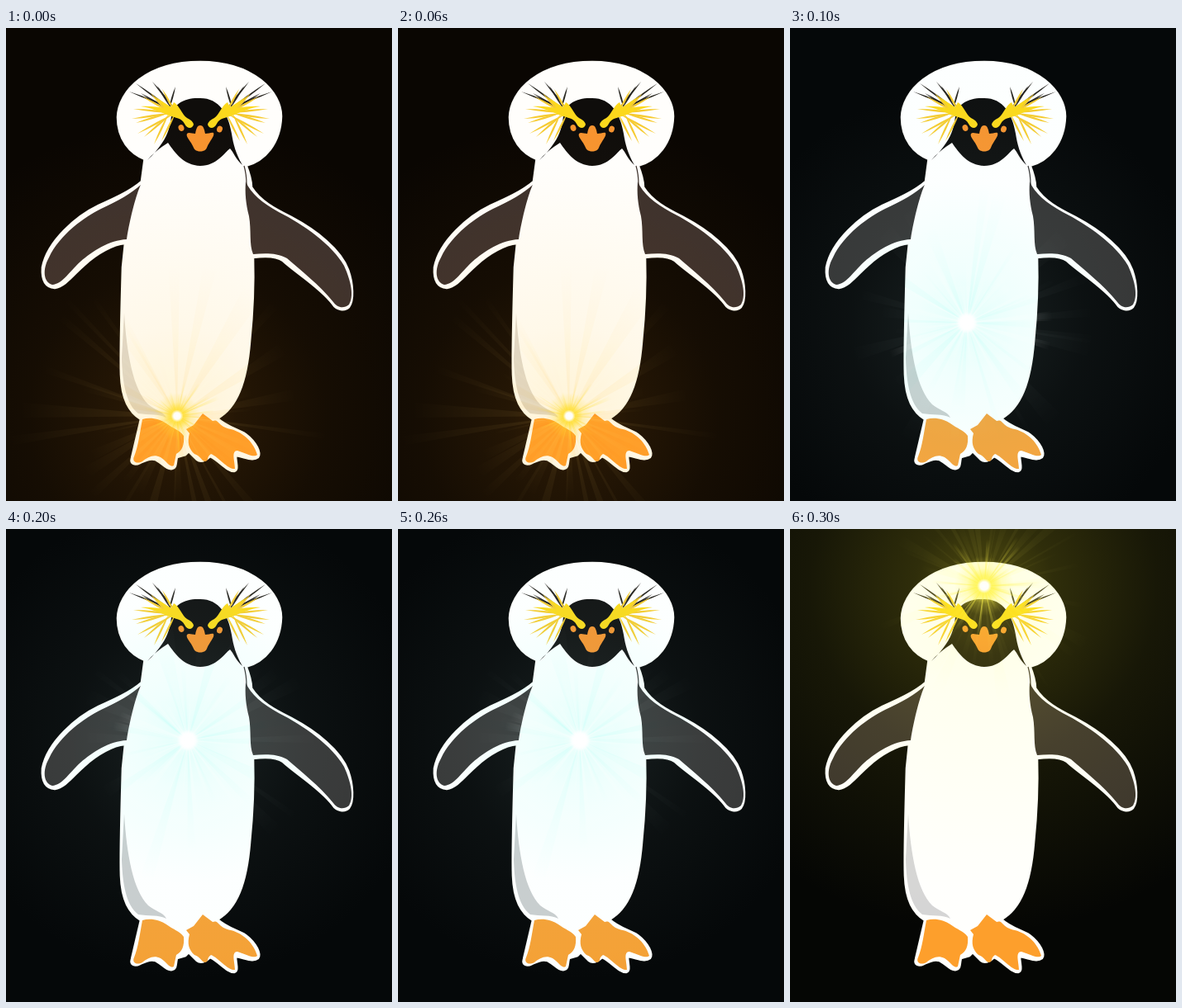
An HTML page with a canvas that plays this animation: 467x573 px, repeating every 0.4 s.

```html
<!DOCTYPE html>
<html lang="en">
<head>
<meta charset="utf-8">
<title>Penguin with a rising light</title>
<style>
  html, body { margin: 0; width: 100%; height: 100%; overflow: hidden; background: #050503; }
  canvas { display: block; width: 467px; height: 573px; }
</style>
</head>
<body>
<canvas width="467" height="573"></canvas>
<script>
const W = 467, H = 573, STEP = 100;
const ctx = document.querySelector('canvas').getContext('2d');

const shape = {
  head: 'M168 159C150 152 135 135 135 108C136 76 170 41 235 41C300 41 333 78 333 107C332 140 313 161 290 167L235 180Z',
  outline: `M168 156L164 186C150 198 130 207 112 215C85 228 50 258 44 290C43 305 48 314 59 315
    C72 313 82 298 95 287C110 273 130 262 144 261L141 290C140 330 138 390 139 420C140 450 149 465 163 474
    L152 521C150 528 156 530 162 527C170 524 174 521 181 523C190 528 194 535 201 534
    C207 533 205 526 207 520L217 517L221 513L231 523Q237 528 247 519C258 524 267 537 276 537
    C282 535 278 527 278 518C290 520 299 525 305 520C309 515 303 502 290 492C280 486 267 483 256 473
    C279 460 291 430 295 380C299 340 300 310 299 278C315 276 327 276 335 282C350 296 380 314 395 334
    C400 342 410 343 415 338C421 330 420 310 414 293C405 268 375 245 345 229C325 219 308 210 297 193
    C297 185 294 175 290 165L235 130Z`,
  wings: `M163 190C158 200 150 230 146 256C125 257 105 270 90 283C75 297 68 310 56 311
    C45 308 44 292 52 278C65 250 95 229 115 219C135 210 152 200 163 190Z
    M290 186C296 200 310 212 330 223C360 238 395 263 409 288C418 308 421 325 415 335
    C408 341 400 338 396 332C380 312 355 292 340 279C328 272 312 273 299 274
    C294 262 297 245 294 228C290 212 289 200 290 186Z`,
  mask: `M235 85C216 84 203 92 200 106C199 118 196 129 189 139Q181 151 171 160Q180 149 196 139
    C205 152 215 166 235 167C255 167 265 150 271 146C275 150 278 159 286 166
    C278 152 275 141 273 128C269 104 258 85 235 85Z`,
  shade: `M143 345C146 395 154 438 172 456C180 463 190 464 194 472C185 467 172 469 160 467
    C145 455 141 430 140 400Z`,
  feet: `M165 474C175 471 187 474 194 479C202 485 210 487 215 494C216 505 213 512 206 516L203 530
    C198 533 195 525 187 520C178 516 172 520 165 525C158 529 152 525 155 519C160 507 162 490 165 474Z
    M238 467L250 476C258 473 256 483 272 486C288 490 300 503 304 517C300 521 290 515 280 512
    C272 512 277 525 277 534C268 535 258 520 248 516C242 520 246 524 241 525C237 525 235 518 228 516
    C221 510 219 502 222 491L218 486L227 481Z`,
  brow: `M227 117C225 123 219 122 216 116C213 109 205 109 197 106C186 101 176 97 163 95
    C174 94 184 96 192 97L180 83L200 96L203 90C210 94 213 105 219 109Q226 112 227 117Z`,
  beak: `M235 118C239 118 240 123 241 128C245 128 249 126 251 127C253 131 246 137 243 145
    C241 151 229 151 227 145C224 137 217 132 219 128C221 126 225 128 229 128C230 123 231 118 235 118Z`
};
const path = Object.fromEntries(Object.entries(shape).map(([name, d]) => [name, new Path2D(d)]));

// Tips of the crest feathers for the left side; the right side is mirrored.
const darkTips = [[149, 77], [157, 67], [163, 79], [177, 65], [183, 70], [205, 71]];
const goldTips = [[154, 98], [152, 110], [157, 115], [159, 128], [167, 132], [179, 141], [188, 137], [165, 83], [175, 79], [189, 74]];

const scenes = [
  { x: 207, y: 470, bg: '#0a0602', wing: '#3b302d', shade: '#dedad4', foot: '#ff9d2b', mask: '#0f0d0b',
    tint: '255,238,200', wide: 310, glow: '120,72,12', reach: 360, power: .42,
    rays: 40, length: 200, ray: '255,205,100', core: '255,222,45', coreSize: 28, dot: 5 },
  { x: 214, y: 357, bg: '#050809', wing: '#343434', shade: '#c9cece', foot: '#f4a33c', mask: '#0e1010',
    tint: '215,255,250', wide: 175, glow: '64,80,78', reach: 290, power: .45,
    rays: 34, length: 150, ray: '225,255,248', core: '255,255,255', coreSize: 20, dot: 9 },
  { x: 220, y: 256, bg: '#050809', wing: '#363636', shade: '#c9cdce', foot: '#f6a136', mask: '#101212',
    tint: '215,255,250', wide: 175, glow: '64,80,78', reach: 290, power: .45,
    rays: 34, length: 150, ray: '225,255,248', core: '255,255,255', coreSize: 20, dot: 9 },
  { x: 235, y: 69, bg: '#050604', wing: '#38322d', shade: '#d5d5d7', foot: '#fd9f2c', mask: '#12110c',
    tint: '255,255,215', wide: 370, glow: '130,122,20', reach: 420, power: .6,
    rays: 40, length: 140, ray: '255,240,90', core: '255,244,75', coreSize: 36, dot: 6 }
];

function randomFrom(seed) {
  return () => (seed = (seed * 16807) % 2147483647) / 2147483647;
}

function fill(name, color) {
  ctx.fillStyle = color;
  ctx.fill(path[name]);
}

function mirrored(paint) {
  paint();
  ctx.save();
  ctx.translate(471, 0);
  ctx.scale(-1, 1);
  paint();
  ctx.restore();
}

function feather([x, y], [rootX, rootY], width) {
  const dx = x - rootX, dy = y - rootY, n = width / Math.hypot(dx, dy);
  const side = k => [rootX + dx * .5 - dy * n * k, rootY + dy * .5 + dx * n * k];
  ctx.beginPath();
  ctx.moveTo(rootX, rootY);
  ctx.quadraticCurveTo(...side(2), x, y);
  ctx.quadraticCurveTo(...side(-2), rootX, rootY);
  ctx.fill();
}

function crest(tips, color, width, rootY) {
  ctx.fillStyle = color;
  tips.forEach((tip, i) => feather(tip, [205 - (i % 3) * 4, rootY], width));
}

function penguin(s) {
  ctx.strokeStyle = '#fbfbf8';
  ctx.lineWidth = 2.6;
  for (const name of ['head', 'outline']) ctx.stroke(path[name]);
  fill('head', '#fff');
  fill('outline', '#fff');
  fill('wings', s.wing);
  ctx.strokeStyle = s.wing;
  ctx.lineWidth = 1.2;
  ctx.stroke(new Path2D('M288 167Q291 177 291 190'));
  fill('shade', s.shade);
  fill('feet', s.foot);
  fill('mask', s.mask);
  mirrored(() => {
    crest(darkTips, '#292722', 1, 99);
    crest(goldTips, '#f6cc32', 1.2, 103);
    fill('brow', '#fcd91c');
  });
  fill('beak', '#f79430');
  ctx.beginPath();
  ctx.ellipse(212, 121, 3.4, 4, -.3, 0, 7);
  ctx.ellipse(258.5, 122.5, 3.4, 4, .3, 0, 7);
  ctx.fill();
}

function radial(s, radius, rgb, stops) {
  const g = ctx.createRadialGradient(s.x, s.y, 0, s.x, s.y, radius);
  stops.forEach(([at, alpha]) => g.addColorStop(at, `rgba(${rgb},${alpha})`));
  return g;
}

function halo(s, radius, rgb, stops) {
  ctx.fillStyle = radial(s, radius, rgb, stops);
  ctx.fillRect(0, 0, W, H);
}

function rays(s, count, length, rgb, alpha, spread, random) {
  for (let i = 0; i < count; i++) {
    const angle = (i + random()) / count * Math.PI * 2;
    const half = spread * (.25 + random());
    const size = length * (.45 + random() * .65);
    ctx.fillStyle = radial(s, size, rgb, [[0, alpha], [.4, alpha * .5], [1, 0]]);
    ctx.beginPath();
    ctx.moveTo(s.x, s.y);
    ctx.arc(s.x, s.y, size, angle - half, angle + half);
    ctx.fill();
  }
}

function draw(index) {
  const s = scenes[index], random = randomFrom(4211 + index * 97);
  const warm = index % 3 === 0;
  ctx.globalCompositeOperation = 'source-over';
  ctx.fillStyle = s.bg;
  ctx.fillRect(0, 0, W, H);
  penguin(s);

  // Tint the white parts, then add light over everything.
  ctx.globalCompositeOperation = 'multiply';
  halo(s, s.wide, s.tint, [[0, .8], [.35, .4], [1, .06]]);
  rays(s, 18, s.length * 1.15, s.tint, .45, .07, random);

  ctx.globalCompositeOperation = 'screen';
  halo(s, s.reach, s.glow, [[0, s.power], [.2, s.power * .55], [.5, s.power * .24], [1, 0]]);
  rays(s, s.rays, s.length, s.ray, warm ? .11 : .08, warm ? .045 : .06, random);

  ctx.globalCompositeOperation = 'source-over';
  if (warm) rays(s, 26, s.coreSize * 1.8, s.core, .75, .04, random);
  else rays(s, 20, 95, '255,255,255', .5, .055, random);
  halo(s, s.coreSize, s.core, [[0, 1], [.35, warm ? .75 : .95], [.6, .25], [1, 0]]);
  halo(s, s.dot * 1.5, '255,255,255', [[0, 1], [.55, .95], [1, 0]]);
}

const start = performance.now();
let shown = -1;
function tick() {
  const index = Math.floor((performance.now() - start) / STEP) % scenes.length;
  if (index !== shown) draw(shown = index);
  requestAnimationFrame(tick);
}
tick();
</script>
</body>
</html>
```
